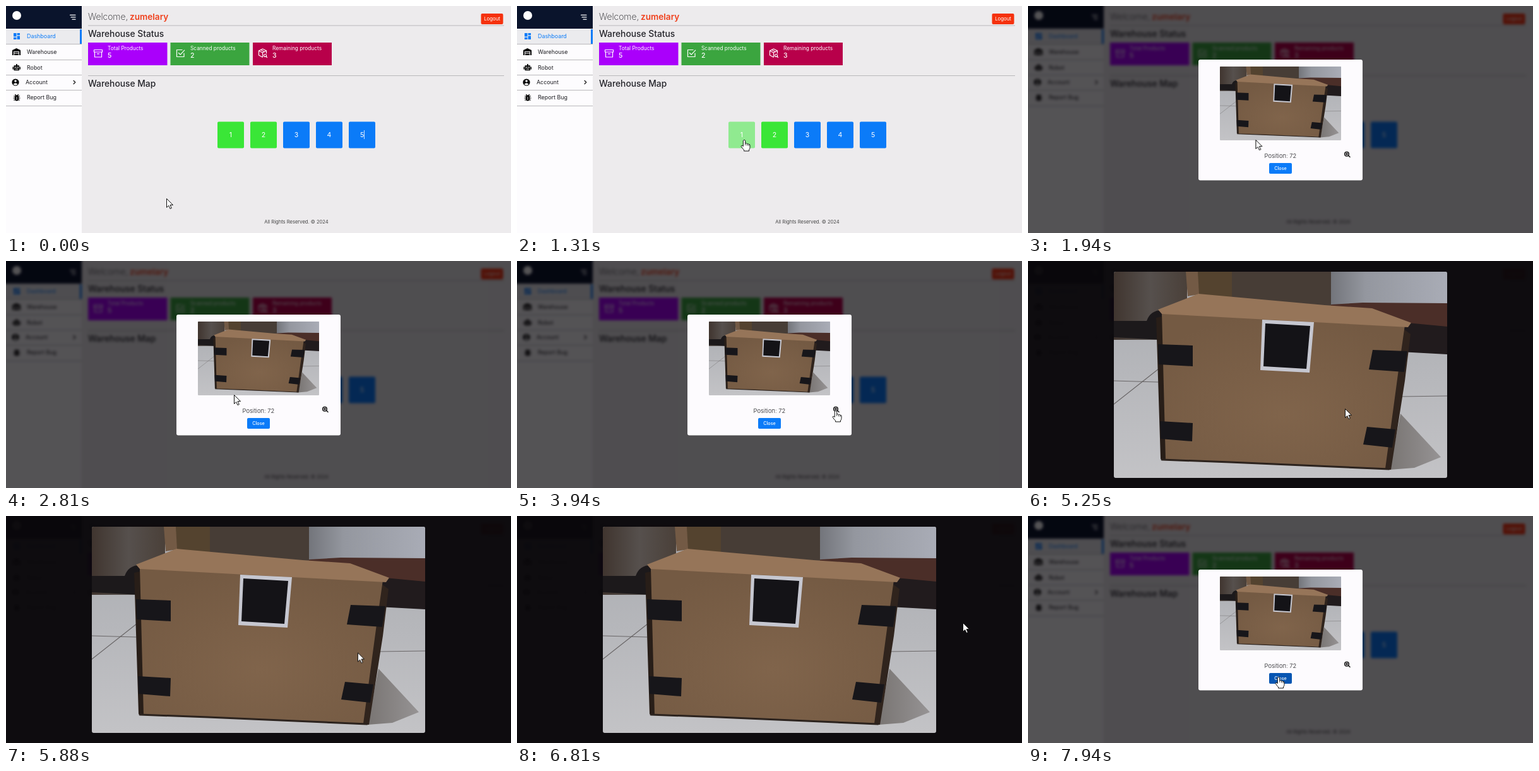
Animation of 800x360 px, one loop 8000 ms. Source, as an HTML page:

```html
<!DOCTYPE html>
<html lang="en">
<head>
<meta charset="utf-8">
<title>Warehouse dashboard</title>
<style>
html, body { margin: 0; width: 100%; height: 100%; overflow: hidden; background: #edebed; }
svg { display: block; width: 100vw; height: 100vh; }
text { font-family: Inter, "Open Sans", sans-serif; fill: #1c1c20; }
.nav text { font-size: 8.9px; }
.heading { font-size: 13.8px; font-weight: 500; fill: #24242a; }
.label { font-size: 8.3px; fill: #fff; }
.count { font-size: 10.5px; font-weight: 500; fill: #fff; }
.tile text { font-size: 10.5px; fill: #fff; text-anchor: middle; }
.mid { text-anchor: middle; }
.line { fill: none; stroke-width: 1.2; stroke-linejoin: round; stroke-linecap: round; }
.rule { fill: none; stroke: #b9b8bb; }

#page, .step { animation: 8s step-end infinite; }
#page { animation-name: soften; }
#modal { animation-name: modal; }
#viewer { animation-name: viewer; }
#caret { animation-name: caret; }
#first { animation-name: tileHover; }
#close { animation-name: closeHover; }
#arrow { animation-name: arrow; }
#hand { animation-name: hand; }
#cursor { animation: travel 8s ease-in-out infinite; }

@keyframes soften { 0% { filter: none } 23.75%, 100% { filter: blur(2px) } }
@keyframes modal { 0% { visibility: hidden } 23.75%, 100% { visibility: visible } }
@keyframes viewer { 0%, 87.5%, 100% { visibility: hidden } 53.75% { visibility: visible } }
@keyframes caret { 0%, 9.1% { opacity: 1 } 2.5%, 15.7%, 100% { opacity: 0 } }
@keyframes tileHover { 0%, 23.75%, 100% { fill: #3ae637 } 12.75% { fill: #90ea90 } }
@keyframes closeHover { 0% { fill: #0b7bf8 } 97%, 100% { fill: #0755b2 } }
@keyframes arrow { 0%, 23.75%, 53.75% { opacity: 1 } 12.75%, 48%, 97%, 100% { opacity: 0 } }
@keyframes hand { 0%, 23.75%, 53.75% { opacity: 0 } 12.75%, 48%, 97%, 100% { opacity: 1 } }
@keyframes travel {
  0%, 2% { transform: translate(254px, 305px) }
  14% { transform: translate(360px, 212px) }
  37.5% { transform: translate(361px, 212px) }
  48.75%, 54% { transform: translate(505px, 237px) }
  57%, 69.2% { transform: translate(502px, 234px) }
  81.2%, 90% { transform: translate(706px, 169px) }
  97.5%, 100% { transform: translate(397px, 255px) }
}
</style>
</head>
<body>
<svg viewBox="0 0 800 360">
  <defs>
    <radialGradient id="cardboard" cx=".5" cy=".65" r=".65">
      <stop stop-color="#80644b"/><stop offset="1" stop-color="#745a43"/>
    </radialGradient>
    <linearGradient id="floor" x2="0" y2="1">
      <stop stop-color="#a9abb0"/><stop offset="1" stop-color="#c3c3c6"/>
    </linearGradient>
    <linearGradient id="wall">
      <stop stop-color="#73757b"/><stop offset=".3" stop-color="#94979f"/><stop offset="1" stop-color="#a9acb6"/>
    </linearGradient>
    <linearGradient id="shade">
      <stop stop-color="#40352f"/><stop offset=".5" stop-color="#56504d"/><stop offset="1" stop-color="#4a4039"/>
    </linearGradient>
    <linearGradient id="shadow">
      <stop stop-color="#797573"/><stop offset="1" stop-color="#969394"/>
    </linearGradient>
    <clipPath id="frame"><rect x="136" y="17" width="528" height="327" rx="3"/></clipPath>

    <g id="photo" clip-path="url(#frame)">
      <rect x="136" y="17" width="528" height="327" fill="url(#floor)"/>
      <path d="M136 17H252V125H136Z" fill="url(#shade)"/>
      <path d="M136 95H188Q194 78 212 78V125L136 121Z" fill="#1c191b"/>
      <path d="M268 17H323V62H268Z" fill="#54432f"/>
      <path d="M323 17H482V80H323Z" fill="#473d36"/>
      <path d="M250 17H269L271 53L253 56Z" fill="#735a45"/>
      <path d="M480 17H664V68L520 70H480Z" fill="url(#wall)"/>
      <path d="M480 69L530 66L664 67V112L480 80Z" fill="#4b2e28"/>
      <path d="M590 97L664 104V148L590 144Z" fill="#211b1d"/>
      <path d="M136 190L206 192M136 227L207 171M592 215L664 214" class="line" stroke="#6a6768"/>
      <path d="M590 242L654 311L612 328L573 331Z" fill="url(#shadow)"/>
      <path d="M203 90L217 87L221 316L210 314Z" fill="#281e18"/>
      <path d="M590 104L606 116L597 190L575 331L564 330Z" fill="#30241d"/>
      <path d="M212 82L597 102L588 165L566 329L218 315Z" fill="url(#cardboard)"/>
      <path d="M212 315L320 319L572 330" class="line" stroke="#2c231e" style="stroke-width:3"/>
      <path d="M206 77L270 52L470 70L545 75L607 98L602 105L380 93L212 84Z" fill="#967559"/>
      <path d="M206 132L261 134V167L207 164ZM209 254L261 257L260 286L210 282ZM546 141L601 143L596 176L540 172ZM537 263L582 267L577 296L531 291Z" fill="#17161a"/>
      <path d="M371 93L453 97L446 177L368 173Z" fill="#c6c7d0"/>
      <path d="M376 99L447 103L441 171L373 167Z" fill="#141317"/>
    </g>
  </defs>

  <g id="page">
    <rect x="-10" y="-10" width="820" height="380" fill="#edebed"/>
    <g class="nav">
      <rect x="-10" width="130" y="-10" height="380" fill="#fdfcfe"/>
      <rect x="-10" width="130" y="-10" height="46" fill="#0a142c"/>
      <rect y="37" width="120" height="23" fill="#ebebee"/>
      <rect x="117" y="37" width="3" height="23" fill="#0b7bf8"/>
      <circle cx="17" cy="15" r="7" fill="#fff"/>
      <path d="M101.500 14.300H110M103 17.700H110M105 21.200H110" class="line" stroke="#fff"/>
      <path d="M0 60.500H120M0 85.500H120M0 109.500H120M0 133.500H120M0 158.500H120" class="rule"/>
      <text x="33" y="51" style="fill:#0b7bf8">Dashboard</text>
      <text x="33" y="75.500">Warehouse</text>
      <text x="33" y="100.500">Robot</text>
      <text x="31" y="123.500">Account</text>
      <text x="33" y="148">Report Bug</text>
      <path d="M12 43h4.500v5.500h-4.500zM12 49.700h4.500v3.300h-4.500zM17.600 43h4.400v3.300h-4.400zM17.600 47.500h4.400v5.500h-4.400z" fill="#0b7bf8"/>
      <path d="M10 78V70L16.500 67L23 70V78H21V72H12V78ZM13 73H20V74.500H13ZM13 75.500H20V78H13Z"/>
      <path d="M16 92h1.800v2.200h3.200v8h-8.500v-8H16ZM10.500 96.500h1.500v4h-1.500zM21.500 96.500h1.500v4h-1.500z"/>
      <path d="M14.500 97.200h1.500M18 97.200h1.500M15 100h4" stroke="#fff" class="line"/>
      <circle cx="15" cy="121" r="5.600"/>
      <circle cx="15" cy="119" r="1.800" fill="#fff"/>
      <path d="M11.500 124q3.500-3.500 7 0q-3.500 3-7 0" fill="#fff"/>
      <path d="M107 118.300L109.800 121L107 123.700" class="line" stroke="#111"/>
      <ellipse cx="17" cy="146" rx="3.200" ry="4.500"/>
      <path d="M12.500 143H21.500M12 146H22M12.500 149H21.500M14.500 140.500L16 142M19.500 140.500L18 142" class="line" stroke="#000"/>
      <path d="M16 145H18M16 147.500H18" stroke="#fff"/>
    </g>

    <text x="130" y="22" font-size="13.900" font-weight="200">Welcome,</text>
    <text x="196" y="22" font-size="13.600" font-weight="600" style="fill:#f0401c">zumelary</text>
    <rect x="752.500" y="12" width="35" height="17" rx="2" fill="#f5310d"/>
    <text x="770" y="23.300" class="mid" font-size="7.800" style="fill:#fff">Logout</text>
    <path d="M130 31H789M130 110.500H789" class="rule"/>
    <text x="130" y="49" class="heading">Warehouse Status</text>
    <text x="130" y="128" class="heading">Warehouse Map</text>

    <rect x="130" y="58" width="125.500" height="36" fill="#aa00fb"/>
    <rect x="260.500" y="58" width="125" height="36" fill="#3ba53f"/>
    <rect x="391" y="58" width="125" height="36" fill="#b8004a"/>
    <text x="161" y="70" class="label">Total Products</text>
    <text x="292" y="70" class="label">Scanned products</text>
    <text x="422" y="70" class="label">Remaining products</text>
    <text x="161" y="82" class="count">5</text>
    <text x="292" y="82" class="count">2</text>
    <text x="422" y="82" class="count">3</text>
    <g class="line" stroke="#fff">
      <path d="M139.500 69.500h13v3.500h-13zM140.500 73v8h11v-8M144.500 75.800h3"/>
      <path d="M282 75v5.500h-11.500v-11H279M273.500 74.500l2.700 2.700l6.500-7"/>
      <path d="M406 81l-5.500-3v-7l6-3l6 3v4M400.500 71l6 3l6-3M406.500 74v7M403.500 69.500l6 3"/>
      <circle cx="410.500" cy="78.500" r="2"/><path d="M412 80l1.500 1.500"/>
    </g>

    <g class="tile">
      <rect id="first" class="step" x="335" y="183.500" width="42" height="42" rx="2" fill="#3ae637"/>
      <rect x="387" y="183.500" width="42" height="42" rx="2" fill="#3ae637"/>
      <g fill="#0b7bf8">
        <rect x="439" y="183.500" width="42" height="42" rx="2"/>
        <rect x="491" y="183.500" width="42" height="42" rx="2"/>
        <rect x="543" y="183.500" width="42" height="42" rx="2"/>
      </g>
      <text x="356" y="208">1</text>
      <text x="408" y="208">2</text>
      <text x="460" y="208">3</text>
      <text x="512" y="208">4</text>
      <text x="564" y="208">5</text>
      <path id="caret" class="step" d="M567.500 197V211" stroke="#fff" stroke-width=".8"/>
    </g>
    <text x="460" y="344.500" class="mid" font-size="7.600" style="fill:#444">All Rights Reserved. © 2024</text>
  </g>

  <g id="modal" class="step">
    <rect width="800" height="360" fill="#020003" fill-opacity=".67"/>
    <rect x="270" y="85" width="260" height="191.500" rx="3" fill="#fdfbfe"/>
    <use href="#photo" transform="translate(304 96) scale(.3636 .358) translate(-136 -17)"/>
    <text x="400" y="240.500" class="mid" font-size="9.400" font-weight="300">Position: 72</text>
    <g class="line" stroke="#111" style="stroke-width:1.500">
      <circle cx="505" cy="234.700" r="3.300"/>
      <path d="M507.600 237.300L510 239.500M503.700 234.700H506.300M505 233.400V236"/>
    </g>
    <rect id="close" class="step" x="382" y="249" width="36" height="17" rx="2" fill="#0b7bf8"/>
    <text x="400" y="260" class="mid" font-size="7.200" font-weight="500" style="fill:#fff">Close</text>
  </g>

  <g id="viewer" class="step">
    <rect width="800" height="360" fill="#0a080b" fill-opacity=".94"/>
    <use href="#photo"/>
  </g>

  <g id="cursor" stroke="#111" fill="#fff" stroke-linejoin="round">
    <path id="arrow" class="step" d="M.5 .5V14.500L3.700 11.500L6 16.500L8.300 15.500L6 10.600H10.500Z"/>
    <g id="hand" class="step">
      <path d="M-1.700 1.500Q0-1 1.700 1.500V6Q3.500 5 4.500 6.700Q6 5.900 7 7.400Q9 6.900 9 9V12.500Q8.800 15 7.500 16V18H-.5V16.200Q-2.500 14.500-5 10.500Q-4.500 8-1.700 10.500Z"/>
      <path d="M1.700 6V9M4.500 7V9.500M7 8V10" fill="none" stroke-width=".8"/>
    </g>
  </g>
</svg>
</body>
</html>
```
